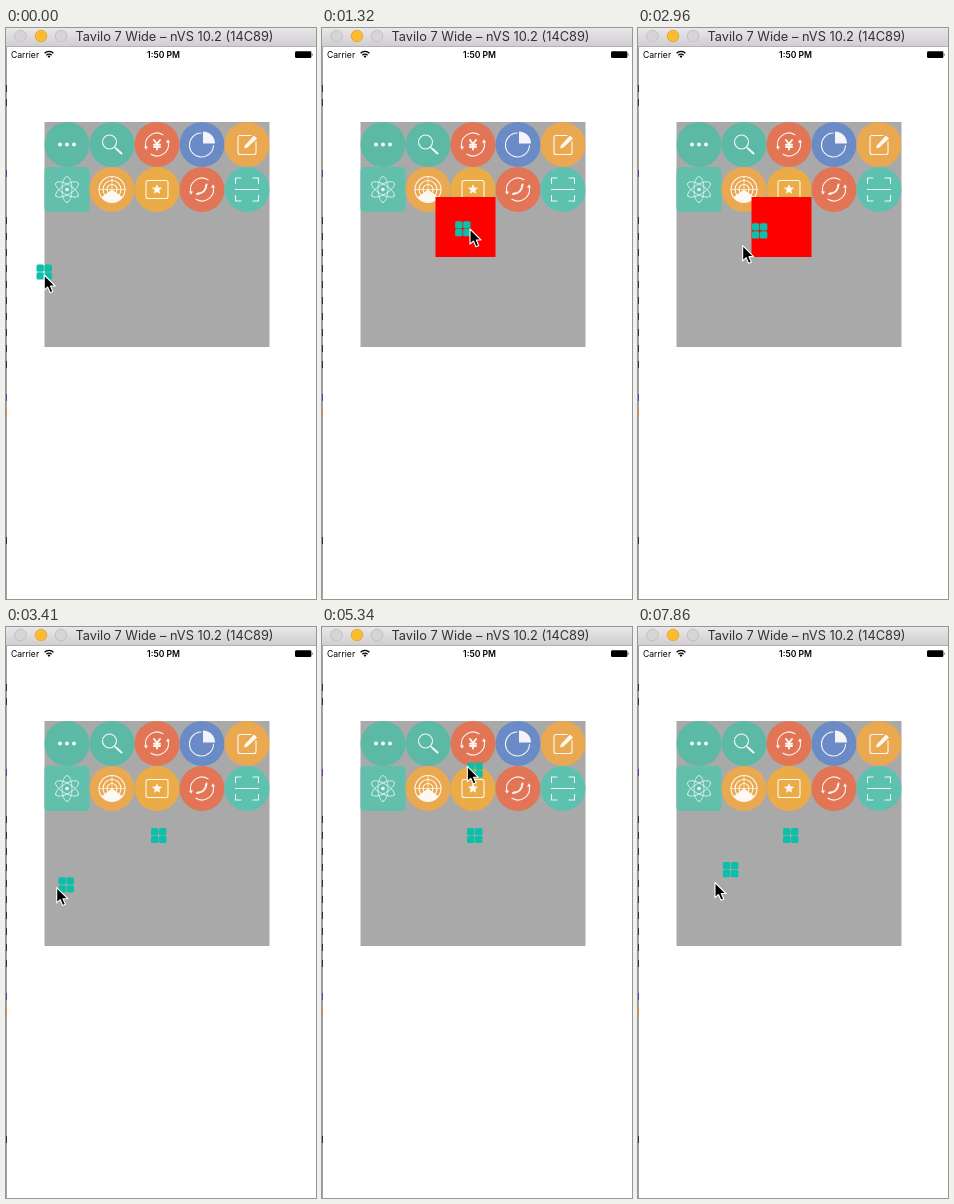
An HTML page that plays this animation: 310x571 px, repeating every 8 s.

```html
<!DOCTYPE html>
<html lang="en">
<head>
<meta charset="utf-8">
<title>Drag and drop</title>
<style>
html, body { margin: 0; width: 100%; height: 100%; overflow: hidden; background: #fff; }
svg { display: block; width: 310px; height: 571px; }
text { font-family: Inter, Roboto, sans-serif; }
.line { fill: none; stroke: #fff; stroke-width: 1.1; stroke-linecap: round; stroke-linejoin: round; }
.thin { stroke-width: .7; }
.bold { stroke-width: 2; }
.solid { fill: #fff; }
#icons g { opacity: .92; }
</style>
</head>
<body>
<svg viewBox="0 0 310 571">
  <defs>
    <linearGradient id="bar" x2="0" y2="1">
      <stop stop-color="#e9e7e9"/><stop offset="1" stop-color="#d0ced0"/>
    </linearGradient>
    <g id="token" fill="#0bbfa8">
      <rect id="tile" x="-7.7" y="-7.6" width="7.4" height="7.3" rx="1.5"/>
      <use href="#tile" x="8"/><use href="#tile" y="7.9"/><use href="#tile" x="8" y="7.9"/>
    </g>
    <g id="cycle">
      <path class="line" d="M-11 3A11.4 11.4 0 0 1 6-9.7M11-3A11.4 11.4 0 0 1-6 9.7"/>
      <path class="solid" d="M-13 2h4l-2 3.2zM13-2H9l2-3.2z"/>
    </g>
  </defs>

  <rect width="310" height="571" fill="#fff"/>
  <path d="M.5 18V571" stroke="#a4a4a4"/>
  <g id="behind"></g>
  <rect width="310" height="18" fill="url(#bar)"/>
  <path d="M0 18.5H310" stroke="#b3b1b3"/>
  <g stroke-width=".8">
    <circle cx="14.5" cy="8" r="5.8" fill="#d6d4d6" stroke="#bebcbe"/>
    <circle cx="35" cy="8" r="5.8" fill="#fdbc2f" stroke="#e0a030"/>
    <circle cx="55" cy="8" r="5.8" fill="#d6d4d6" stroke="#bebcbe"/>
  </g>
  <text x="168.5" y="13" font-size="12.8" text-anchor="middle" fill="#333133">Tavilo 7 Wide – nVS 10.2 (14C89)</text>

  <text x="5" y="30" font-size="8.6">Carrier</text>
  <path d="M38.6 25.3a6.2 6.2 0 0 1 8.8 0M40.4 27.2a3.6 3.6 0 0 1 5.2 0" fill="none" stroke="#000" stroke-width="1.3"/>
  <path d="M41.6 28.3a2 2 0 0 1 2.8 0L43 30z"/>
  <text x="157.5" y="30" font-size="8.6" font-weight="600" text-anchor="middle">1:50 PM</text>
  <rect x="289" y="23.3" width="16.4" height="6.8" rx="1.4"/>
  <path d="M306 25.3q1.3 1.4 0 2.8z"/>

  <rect x="38.5" y="94" width="225" height="225" fill="#a9a9a9"/>
  <g id="icons"></g>
  <use id="dropped" href="#token" x="152.7" y="208.5"/>
  <rect id="target" x="113.5" y="169" width="60" height="60" fill="#f00"/>
  <use id="dragged" href="#token"/>
  <path id="cursor" d="M0 0V15.2L3.5 12 6 17.7 8.7 16.5 6.3 11H11z" stroke="#fff" stroke-width="1.1" stroke-linejoin="round"/>
</svg>
<script>
const $ = id => document.getElementById(id);
const line = (d, weight = '') => `<path class="line ${weight}" d="${d}"/>`;
const solid = d => `<path class="solid" d="${d}"/>`;
const ring = (r, x = 0, y = 0) => `<circle class="line" cx="${x}" cy="${y}" r="${r}"/>`;
const dot = (r, x = 0) => `<circle class="solid" cx="${x}" r="${r}"/>`;
const cycle = '<use href="#cycle"/>';
const orbit = angle => `<ellipse class="line thin" rx="13" ry="5" transform="rotate(${angle})"/>`;

const star = 'M' + Array.from({ length: 10 }, (_, i) => {
  const r = i % 2 ? 2.4 : 5.4, a = i * Math.PI / 5;
  return `${r * Math.sin(a)} ${-r * Math.cos(a)}`;
}).join('L') + 'z';

const icons = [
  ['#5cb9a5', dot(2, -7) + dot(2) + dot(2, 7)],
  ['#5cb9a5', ring(7, -2.5, -2.5) + line('M2.5 2.5L4 4') + line('M4.5 4.5L9.5 9', 'bold')],
  ['#e17556', cycle + line('M-3-4.5L0-.5 3-4.5M0-.5V5M-3 .2H3M-3 2.6H3', 'bold')],
  ['#6a8bc5', line('M-1-11.5A12 12 0 1 0 11.5 1') + solid('M1-1V-13A12 12 0 0 1 13-1z')],
  ['#eaa851', line('M4-9H-7a2 2 0 0 0-2 2V8a2 2 0 0 0 2 2H7a2 2 0 0 0 2-2V-3') + solid('M-3 4L-2 .8 7-9 10-6 .5 3z')],
  ['#62bfac', orbit(30) + orbit(90) + orbit(150) + dot(1.8)],
  ['#eaa851', ring(13) + ring(9) + ring(5) + line('M0-13V0M-13 0H13', 'thin') + solid('M0 0L10.5 7.7A13 13 0 0 1-10.5 7.7z')],
  ['#ebab47', line('M-9-9H9a2 2 0 0 1 2 2V7a2 2 0 0 1-2 2H-9a2 2 0 0 1-2-2V-7a2 2 0 0 1 2-2z') + solid(star)],
  ['#e17556', cycle + line('M-4.5 4.5Q3.5 3.5 4.5-4.5M-5 4.5l2.3-.8M4.5-5l-.7 2.4', 'bold')],
  ['#5cc1ae', line('M-11.5-6V-11.5H-6M6-11.5H11.5V-6M11.5 6V11.5H6M-6 11.5H-11.5V6M-11.5 0H11.5')]
];
$('icons').innerHTML = icons.map(([color, art], i) => {
  const x = 61 + i % 5 * 45, y = 116.5 + Math.floor(i / 5) * 45;
  return `<svg x="${x}" y="${y}" overflow="visible"><rect x="-22.5" y="-22.5" width="45" height="45" rx="${i === 5 ? 4 : 22.5}" fill="${color}"/><g>${art}</g></svg>`;
}).join('');

// Slivers of the editor window behind the simulator
const sliver = (y, color = '#333') => `<rect y="${y}" width="1" height="7" fill="${color}"/>`;
$('behind').innerHTML = [57, 71, 509].map(y => sliver(y)).join('') +
  Array.from({ length: 10 }, (_, i) => sliver(189 + i * 16)).join('') +
  sliver(142, '#7a2f9e') + sliver(366, '#3550b8') + sliver(381, '#d58a35');

const STEP = 148.2, LAG = .75;

// Turning points of the pointer: step, x, y
const turns = [
  [0, 38.2, 247], [6, 119.3, 212], [9, 148, 201], [11, 121, 197], [13, 142.3, 195],
  [15, 142.3, 195], [18, 132, 192], [19, 126, 198], [22, 62, 257], [23, 50.7, 260.7],
  [24, 46, 262], [27, 128, 207], [30, 152, 203], [34, 152, 170], [35.25, 152, 143],
  [36, 145.3, 139.3], [37, 148, 130], [43.25, 126, 190], [44, 121, 189],
  [48, 121, 189], [49, 120, 188.5], [50, 120, 188.5], [51, 100, 217], [53, 77, 255.5]
];
// Where the token hangs relative to the pointer in each drag
const drags = [
  { grab: 0, drop: 12.9, dx: 0, dy: -3 },
  { grab: 18.5, drop: 44, dx: 1, dy: 0 },
  { grab: 50.5, drop: 53, dx: 7, dy: 1.5 }
];

function pointerAt(step) {
  const next = turns.findIndex(turn => turn[0] > step);
  if (next < 0) return turns.at(-1).slice(1);
  const [s0, x0, y0] = turns[next - 1], [s1, x1, y1] = turns[next];
  const u = (step - s0) / (s1 - s0);
  return [x0 + (x1 - x0) * u, y0 + (y1 - y0) * u];
}

function draw() {
  const step = Math.floor((performance.now() % 8000 + 14) / STEP);
  const drag = drags.findLast(d => d.grab <= step);
  // The token trails the pointer and stays where it was when released
  const [tx, ty] = pointerAt(Math.max(drag.grab, Math.min(step, drag.drop) - LAG));
  const x = tx + drag.dx, y = ty + drag.dy;
  const inside = Math.abs(x - 143.5) < 22 && Math.abs(y - 199) < 22;
  const show = (id, on) => $(id).style.display = on ? '' : 'none';
  const place = (id, x, y) => $(id).setAttribute('transform', `translate(${x} ${y})`);

  show('target', inside && step <= drag.drop);
  show('dropped', step > drags[0].drop);
  place('dragged', x, y);
  place('cursor', ...pointerAt(step));
  requestAnimationFrame(draw);
}
draw();
</script>
</body>
</html>
```
